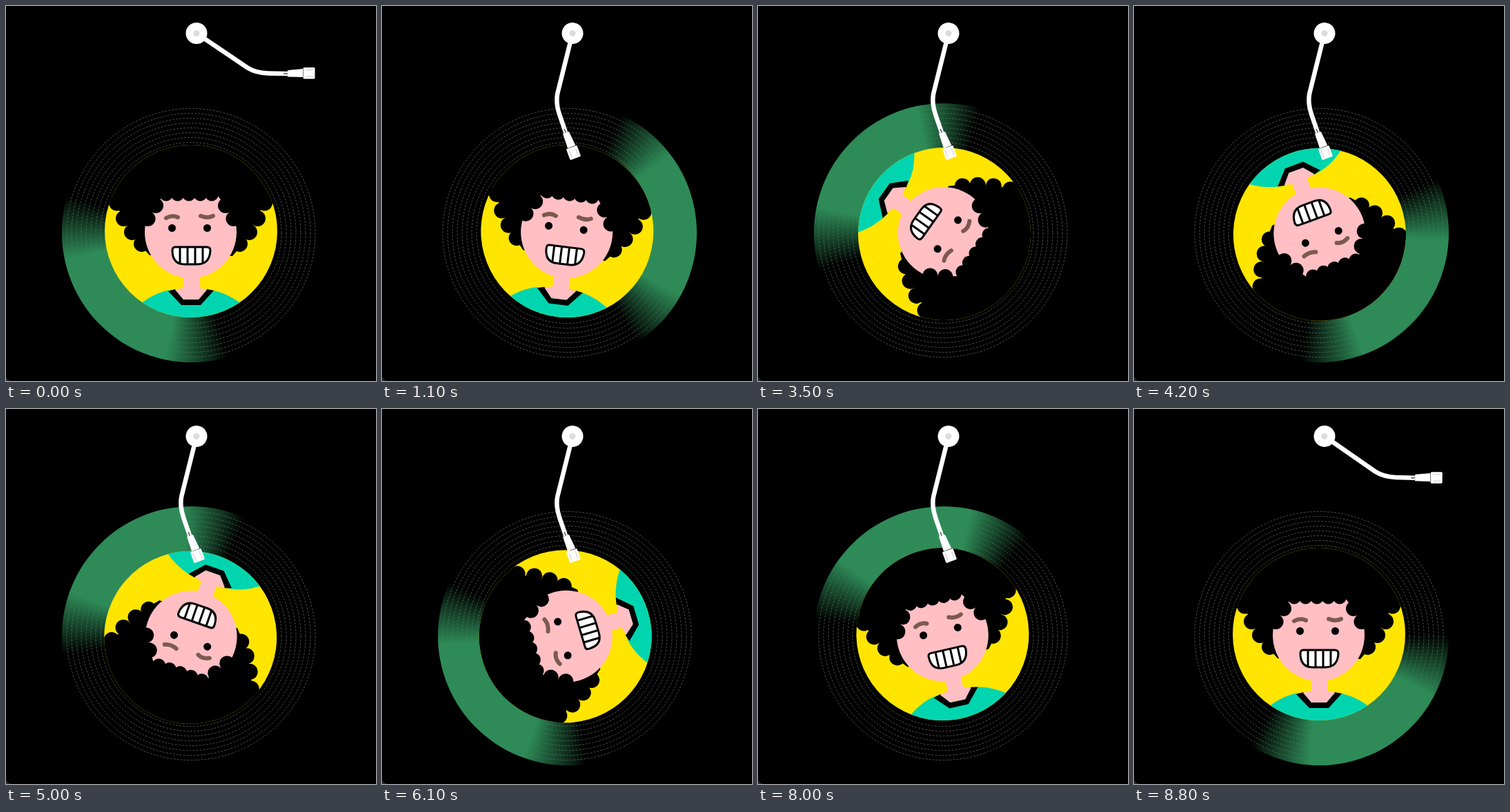
Animation, 536 px wide and 543 px high, one loop 8.9 s. Source, as an HTML page:

```html
<!DOCTYPE html>
<html lang="en">
<head>
<meta charset="utf-8">
<title>Record player</title>
<style>
  html, body { margin: 0; width: 100%; height: 100%; overflow: hidden; background: #000; }
  body { position: relative; }
  svg, #glow { position: absolute; left: 0; top: 0; display: block; }
  svg { width: 100%; height: 100%; }
  #glow {
    left: 81px; top: 141px; width: 375px; height: 375px; border-radius: 50%;
    background: conic-gradient(from var(--heading), #2e8b57 33deg, #2e8b5700 62deg 298deg, #2e8b57 327deg);
  }
</style>
</head>
<body>
<svg>
  <path d="M0 536Q1 542 8 543H0Z" fill="#2a2a2a"/>
  <g id="rings" fill="none" stroke="#606060" stroke-width=".8" stroke-dasharray="3 2"></g>
</svg>
<div id="glow"></div>
<svg>
  <defs><clipPath id="label"><circle cx="268" cy="326" r="125"/></clipPath></defs>

  <g id="portrait">
    <circle cx="268" cy="326" r="125" fill="#ffe500"/>
    <g clip-path="url(#label)">
      <path d="M140 190H396V275L384 278 365 300 346 341 328 362 208 361 187 337 165 297 149 288H140Z"/>
      <g id="curls"></g>
      <path d="M188 437Q214 414 240 411H296Q324 416 348 437V460H188Z" fill="#00d5b0"/>
      <path d="M235 413 254 433H282L301 412 291 410 279 425H257L245 410Z"/>
      <path d="M257 380V408L245 411 257 425H279L291 411 280 408V380Z" fill="#ffbfc3"/>
      <circle cx="267.5" cy="327.5" r="66.5" fill="#ffbfc3"/>
      <path d="M195 255H340V310L328 308 317 289 307 275H227L217 289 206 308 195 310Z"/>
      <g id="fringe"></g>
      <path d="M232 307Q241 302 249 306M282 304Q292 308 300 304" fill="none" stroke="#7b5a50" stroke-width="6" stroke-linecap="round"/>
      <circle cx="240.5" cy="321.5" r="5.5"/>
      <circle cx="291.5" cy="321.5" r="5.5"/>
      <g stroke="#000" stroke-width="3">
        <path d="M245 349H291Q296 349 296 354Q295 374 277 374H259Q241 374 241 354Q241 349 245 349Z" fill="#fff"/>
        <path d="M252 349V372M263 349V374M274 349V374M285 349V372"/>
      </g>
    </g>
  </g>

  <g id="arm" fill="#fff">
    <path d="M276 39.5L350 89.5Q362 97 380 97.5L408 98" fill="none" stroke="#fff" stroke-width="6.5"/>
    <path d="M402 98H409" stroke="#555" stroke-width="1.5"/>
    <path d="M408 93L430 91V103L408 102.5Z"/>
    <rect x="430.5" y="89" width="17" height="16.5" rx="1.5"/>
    <path d="M434 92.5H445M434 102H445" stroke="#ccc"/>
    <circle cx="276" cy="39.5" r="15.5"/>
    <circle cx="276" cy="39.5" r="4.5" fill="#ddd"/>
  </g>
</svg>

<script>
const LOOP = 8900, STEP = 100, FACE_X = 267.5;
const $ = id => document.getElementById(id);

const repeat = (count, make) => Array.from({ length: count }, (_, i) => make(i)).join("");
const circle = (x, y, r) => `<circle cx="${x}" cy="${y}" r="${r}"/>`;
const mirrored = (dx, y, r) => circle(FACE_X - dx, y, r) + circle(FACE_X + dx, y, r);

$("rings").innerHTML = repeat(8, i => circle(268, 328.5, 180 - 7 * i));
$("curls").innerHTML = repeat(4, i => mirrored(107 - 9 * i - i * i, 285 + 24 * i - 1.4 * i * i, 11.5));
$("fringe").innerHTML =
  repeat(5, i => circle(232 + 16.5 * i, 272.5, 10)) +
  repeat(2, i => mirrored(50.5 + 11.5 * i, 289 + 19 * i, 11));

const progress = (t, from, to) => Math.min(1, Math.max(0, (t - from) / (to - from)));
const smooth = x => x * x * (3 - 2 * x);

function draw(now) {
  const t = Math.floor((now % LOOP) / STEP) * STEP;
  const arm = 70 * (smooth(progress(t, 0, 1000)) - smooth(progress(t, 8050, 8850)));
  const turn = 360 * progress(t, 960, 8260);
  const heading = 225 + 2086 * progress(t, 200, 8700);
  $("glow").style.setProperty("--heading", `${heading}deg`);
  $("portrait").setAttribute("transform", `rotate(${turn} 268 328.5)`);
  $("arm").setAttribute("transform", `rotate(${arm} 276 39.5)`);
}

const start = performance.now();
function tick() {
  draw(performance.now() - start);
  requestAnimationFrame(tick);
}
tick();
</script>
</body>
</html>
```
